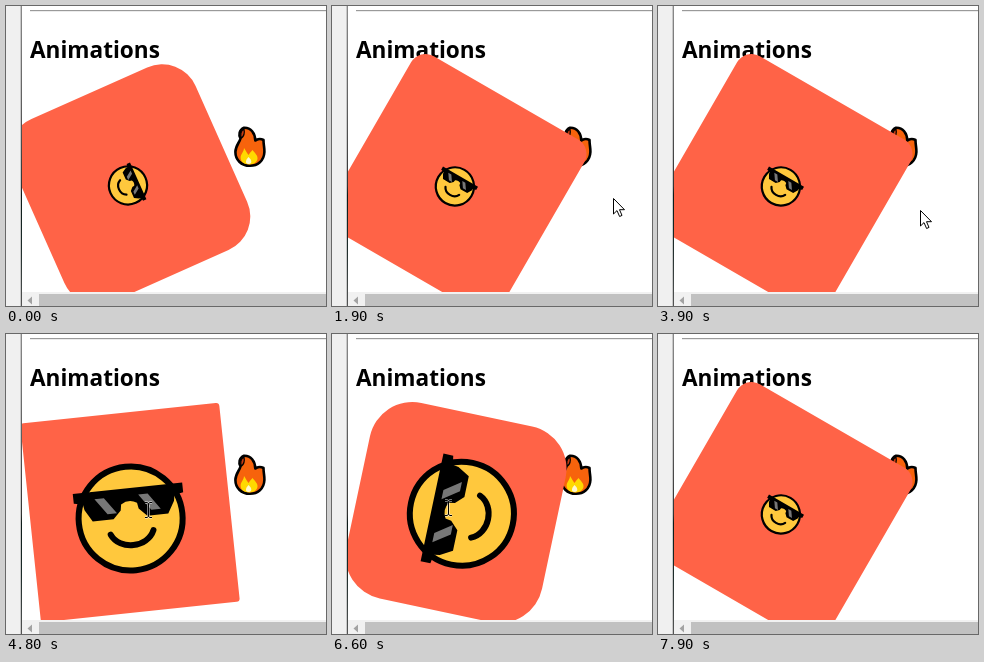
Write an HTML page that moves like this. It is 320 px wide and 300 px high and loops after 8 s.

```html
<!DOCTYPE html>
<html lang="en">
<head>
<meta charset="utf-8">
<title>Animations</title>
<style>
  html, body { margin: 0; width: 100%; height: 100%; overflow: hidden; background: #fff; }
  svg { display: block; }
  h2, text { font: 700 22.6px "Open Sans", "Noto Sans", sans-serif; }
</style>
</head>
<body>
<svg width="320" height="300" viewBox="0 0 320 300">
  <defs>
    <clipPath id="page"><path d="M16 0H320V286H16Z"/></clipPath>
    <linearGradient id="edge" x1="0" y1="0" x2="0" y2="1">
      <stop offset="0" stop-color="#8a8a8a"/>
      <stop offset=".35" stop-color="#5c5c5c"/>
      <stop offset=".6" stop-color="#333"/>
      <stop offset=".63" stop-color="#0c1a18"/>
      <stop offset=".8" stop-color="#1c2b29"/>
      <stop offset="1" stop-color="#555"/>
    </linearGradient>
  </defs>

  <g clip-path="url(#page)">
    <path d="M24 4.5H320" stroke="#9a9a9a"/>
    <path d="M24 5.5H320" stroke="#ececec"/>
    <text x="24" y="52">Animations</text>

    <g id="flame" stroke-linejoin="round">
      <path d="M238 121.8C245 121.5 249 127 249.3 134.5C251.5 133.5 253 131.5 257.5 134C257.5 139 258.6 142 258.4 146C258 155 251.5 159.8 244 159.8C235 159.8 229.4 153.5 229.4 146C229.4 140 233.5 136.5 234.5 132.5C232.5 129.5 233 124 238 121.8Z"
            fill="#f7630c" stroke="#000" stroke-width="2.6"/>
      <path d="M238 123C234.6 125 234 129 235.6 132C238 130 238.8 127 238 123Z" fill="#c83c12" stroke="#000" stroke-width="1.2"/>
      <path d="M238 142C240 145 241 147 242.5 149C244 147 245 145.5 246.5 144C248.5 147 252 149 251.5 153C250.5 157 247 158.4 243.5 158.4C238.5 158.4 234.5 156 234.6 151.5C234.8 148 237.8 146 238 142Z" fill="#ffd800"/>
      <path d="M242.5 151C246 154 246.5 158 242.5 158C238.7 158 239.5 154 242.5 151Z" fill="#fff6cf"/>
    </g>

    <g id="box">
      <rect id="tile" x="-100" y="-100" width="200" height="200" fill="#ff6347"/>
      <g id="face">
        <circle cy="6" r="52" fill="#ffc83d" stroke="#000" stroke-width="6"/>
        <g transform="translate(0 6)">
          <path d="M-21.5 14C-14 31 14 31 21.5 14" fill="none" stroke="#000" stroke-width="6" stroke-linecap="round"/>
          <path d="M-55-30.5H55V-20.5L46-19L45-13L38-1H17L9-9L8-15Q0-20-8-15L-9-9L-17-1H-38L-45-13L-46-19L-55-20.5Z"/>
          <path d="M-34-23H-24.500L-13-6.500H-22.500ZM10-23H19.500L31-6.500H21.500Z" fill="#777"/>
        </g>
      </g>
    </g>
  </g>

  <path d="M0 0H14V300H0Z" fill="#f0f0f0"/>
  <path d="M14 0H15V300H14Z" fill="#c8c8c8"/>
  <path d="M15 0H16V300H15Z" fill="url(#edge)"/>
  <path d="M16 286H320V300H16Z" fill="#f1f1f1"/>
  <path d="M33 288H320V300H33Z" fill="#c1c1c1"/>
  <path d="M26 290.500V298.500L21.500 294.500Z" fill="#a3a3a3"/>

  <g id="cursor">
    <path id="arrow" d="M.5 .5V16L4 12.600L6.600 18.500L9 17.400L6.500 11.700H11.500Z" fill="#fff" stroke="#000"/>
    <g id="beam" fill="none">
      <path d="M-3-7.500H-1L.5-6.500L2-7.500H4M.5-6.500V6.500M-3 7.500H-1L.5 6.500L2 7.500H4" stroke="#fff" stroke-opacity=".6" stroke-width="2.600"/>
      <path d="M-3-7.500H-1L.5-6.500L2-7.500H4M.5-6.500V6.500M-3 7.500H-1L.5 6.500L2 7.500H4" stroke="#000"/>
    </g>
  </g>
</svg>
<script>
const LOOP = 8000, TICK = 100, TURN = 1000;
const CENTER = { x: 124, y: 178.5 };
const SMALL = 36 / 98;

// pointer stops: time, x, y
const stops = [
  [400, 150, 290], [1000, 122, 167], [1900, 281, 192], [2800, 129, 176],
  [3800, 265, 205], [4800, 142, 176], [5600, 268, 195], [6600, 116, 174],
  [7250, 0, 184]
];

const $ = id => document.getElementById(id);
const [box, tile, face, cursor, arrow, beam] =
  ["box", "tile", "face", "cursor", "arrow", "beam"].map($);

function pointerAt(t) {
  const i = stops.findIndex(s => s[0] > t);
  if (i < 1) return null;
  const [t0, x0, y0] = stops[i - 1], [t1, x1, y1] = stops[i];
  const k = (1 - Math.cos(Math.PI * (t - t0) / (t1 - t0))) / 2;
  return { x: x0 + (x1 - x0) * k, y: y0 + (y1 - y0) * k };
}

// the hover area grows with the face, so each step depends on the one before
const hover = [];
for (let i = 0; i < LOOP / TICK; i++) {
  const p = pointerAt(i * TICK);
  const reach = hover[i - 1] ? 62 : 24;
  hover.push(!!p && Math.hypot(p.x - CENTER.x, p.y - CENTER.y) < reach);
}

function show(el, on) {
  el.setAttribute("visibility", on ? "visible" : "hidden");
}

function draw(now) {
  const step = Math.floor((now % LOOP) / TICK), t = step * TICK;
  const angle = (66 + 360 * t / TURN) % 360;
  const big = hover[step], p = pointerAt(t);

  box.setAttribute("transform", `translate(${CENTER.x} ${CENTER.y}) rotate(${angle})`);
  tile.setAttribute("rx", 100 * (1 - Math.abs(angle - 180) / 180));
  face.setAttribute("transform", `scale(${big ? 1 : SMALL})`);

  show(arrow, p && !big);
  show(beam, p && big);
  if (p) cursor.setAttribute("transform", `translate(${Math.round(p.x)} ${Math.round(p.y)})`);
}

function frame() {
  draw(performance.now());
  requestAnimationFrame(frame);
}
draw(0);
requestAnimationFrame(frame);
</script>
</body>
</html>
```
